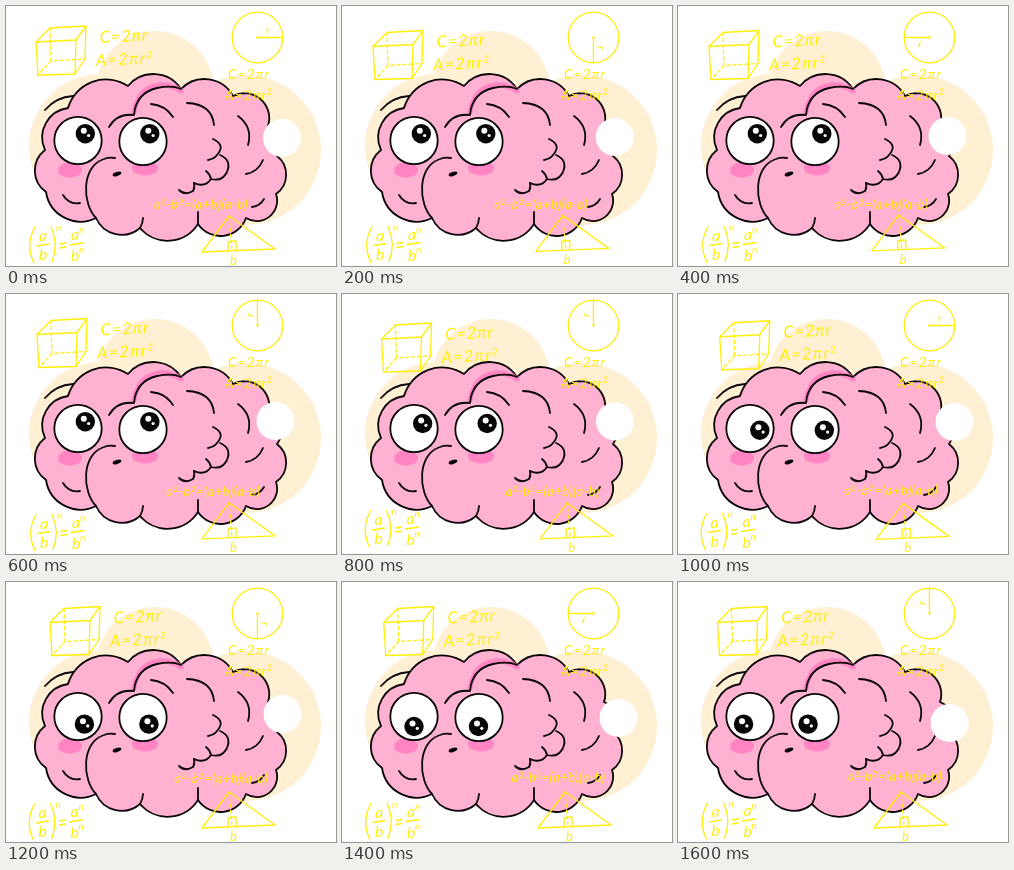
Animation of 330 by 260 pixels, one loop 1.8 s. Source, as an HTML page:

```html
<!DOCTYPE html>
<html lang="en">
<head>
<meta charset="utf-8">
<title>Thinking brain</title>
<style>
html, body { margin: 0; width: 100%; height: 100%; overflow: hidden; background: #fff; }
svg { display: block; width: 330px; height: 260px; }
.ink { fill: none; stroke: #080608; stroke-width: 1.8; stroke-linecap: round; stroke-linejoin: round; }
.shade { fill: none; stroke: #ff84c3; stroke-width: 5; stroke-linecap: round; }
.chalk { fill: none; stroke: #ffee0a; stroke-width: 1.3; stroke-linecap: round; stroke-linejoin: round; }
.dash { stroke-dasharray: 3 3; }
text { fill: #ffee0a; font-family: Lato, "Open Sans", sans-serif; font-style: italic; }
</style>
</head>
<body>
<svg viewBox="0 0 330 260" xmlns="http://www.w3.org/2000/svg">
  <g fill="#fff0d3">
    <circle cx="95" cy="140" r="72"/>
    <circle cx="149" cy="84" r="59"/>
    <circle cx="240" cy="144" r="75"/>
  </g>

  <path id="body" class="ink" style="fill:#ffb1d2"/>
  <path class="shade" d="M128 106Q132 82 153 79Q166 78 175 85"/>
  <g class="ink">
    <path d="M90 212C76 198 75 160 98 153Q103 151 109 152"/>
    <path d="M103 121Q111 107 128 109Q130 87 151 82Q166 79 175 83"/>
    <path d="M39 104Q50 91 67 90"/>
    <path d="M145 98Q159 99 167 111"/>
    <path d="M181 97Q206 98 208 119"/>
    <path d="M232 110Q247 121 242 139"/>
    <path d="M207 133Q220 139 211 149Q208 153 202 154"/>
    <path d="M214 149Q226 154 221 166Q216 176 205 173Q204 168 200 165"/>
    <path d="M205 173Q199 182 188 177"/>
    <path d="M173 184Q179 190 187 185Q189 182 188 177"/>
    <path d="M240 168Q252 166 257 154"/>
    <path d="M57 189Q63 199 74 197"/>
    <path d="M246 201Q254 200 258 193"/>
    <path d="M192 218V206"/>
    <path d="M134 222Q137 217 137 212"/>
  </g>
  <g fill="#ff84c3">
    <ellipse cx="64" cy="164" rx="12" ry="7.5"/>
    <ellipse cx="139" cy="162" rx="13" ry="7.5"/>
  </g>
  <ellipse cx="111" cy="168" rx="4.5" ry="2" transform="rotate(-18 111 168)" fill="#080608"/>
  <g class="ink" style="fill:#fff">
    <circle cx="72" cy="134.5" r="23.7"/>
    <circle cx="137" cy="135.5" r="23.7"/>
  </g>
  <g id="pupils"></g>

  <circle id="disc" r="19" fill="#fff"/>

  <g id="cube">
    <g class="chalk">
      <path d="M30 36L70 34L69 68L32 69ZM30 36L44 22L80 20L79 53L69 68M70 34L80 20"/>
      <path class="dash" d="M44 22L45 55L79 53M45 55L32 69"/>
    </g>
    <g transform="rotate(-3 94 37)" font-size="16.5">
      <text x="94" y="37" letter-spacing=".8">C=2πr</text>
      <text x="89" y="60" letter-spacing="1.2">A=2πr<tspan dy="-5" font-size="10">2</tspan></text>
    </g>
  </g>

  <circle class="chalk" cx="251.5" cy="31.5" r="25.3"/>
  <g id="radius">
    <path class="chalk" d="M251.5 31.5H276.5"/>
    <circle cx="251.5" cy="31.5" r="1.2" fill="#ffee0a"/>
    <text x="260" y="28" font-size="11">r</text>
  </g>
  <g font-size="14" letter-spacing=".8">
    <text x="222" y="73">C=2πr</text>
    <text x="219" y="94">A=2πr<tspan dy="-5" font-size="9">2</tspan></text>
  </g>

  <g id="fraction">
    <path class="chalk" d="M29 221Q19 239 28 257M45 221Q53 238 46 256M31 240L43 238M54 238L60 237M54 242L60 241M64 239L77 237"/>
    <g font-size="16">
      <text x="33" y="235">a</text><text x="33" y="254">b</text>
      <text x="65" y="234">a</text><text x="65" y="255">b</text>
    </g>
    <g font-size="10">
      <text x="50" y="225">n</text><text x="73" y="227">n</text><text x="73" y="247">n</text>
    </g>
  </g>

  <text id="squares" font-size="13" letter-spacing=".5">a<tspan dy="-4" font-size="8">2</tspan><tspan dy="4">-b</tspan><tspan dy="-4" font-size="8">2</tspan><tspan dy="4">=(a+b)(a-b)</tspan></text>

  <g id="triangle">
    <path class="chalk" d="M223 210L196 246L269 243ZM222 244V236L230 235V244"/>
    <path class="chalk dash" d="M223 210L226 244"/>
    <text x="224" y="259" font-size="13">b</text>
  </g>
</svg>
<script>
const STEP = 200, COUNT = 9;
const el = id => document.getElementById(id);

// Joins the points clockwise with outward bumps; a third value makes one rounder.
const rim = [[39,144],[62,102],[122,80],[175,83],[227,90,.54],[262,120],[271,150],
  [270,188,.53],[240,212,.56],[192,218],[134,222],[90,212],[40,186]];
el("body").setAttribute("d", rim.map(([x, y, round = .62], i) => {
  const [u, v] = rim[(i + 1) % rim.length];
  const r = Math.hypot(u - x, v - y) * round;
  return (i ? "" : `M${x} ${y}`) + `A${r} ${r} 0 0 1 ${u} ${v}`;
}).join("") + "Z");

el("pupils").innerHTML = [72, 136.5].map(x => `<g transform="translate(${x} 134.5)">
  <circle r="9.7" fill="#080608"/>
  <circle cx="-1.5" cy="-3" r="3" fill="#fff"/>
  <circle cx="3.3" cy="1.8" r="1.6" fill="#fff"/></g>`).join("");

// Straight travel between key points [step, x, y].
function along(keys, k) {
  const i = Math.max(1, keys.findIndex(p => p[0] >= k));
  const [a, x, y] = keys[i - 1], [b, u, v] = keys[i];
  const f = (k - a) / (b - a);
  return [x + (u - x) * f, y + (v - y) * f];
}

const cubeKeys = [[0,0,0],[1,1,4.5],[3,1,4.5],[4,9.5,9],[6,14,4.5],[8,9.5,4.5]];
const discKeys = [[0,276,132],[2,269.5,130],[3,269.5,127],[5,276.5,128],[7,276.5,136],[8,271.5,141]];
const fractionKeys = [[0,0,0],[1,1,-.5],[3,1,-.5],[4,-.5,-4],[6,-.5,1],[8,.5,0]];

function gaze(k) {
  const angle = Math.max(-43, 40 * (k - 4) - 30) * Math.PI / 180;
  return [10 * Math.cos(angle), 10 * Math.sin(angle)];
}

function slide(k) {
  const f = k / (COUNT - 1);
  return [148 + 22 * Math.sin(f * Math.PI / 2), 203 - 4 * f * f];
}

function sway(k) {
  const wave = Math.PI * Math.min(k, 6) / 6;
  return [-2.5 * Math.sin(2 * wave), -1.2 * Math.sin(wave)];
}

function move(id, [x, y]) {
  el(id).setAttribute("transform", `translate(${x} ${y})`);
}

function draw(ms) {
  const k = Math.floor(ms / STEP) % COUNT;
  move("cube", along(cubeKeys, k));
  move("disc", along(discKeys, k));
  move("fraction", along(fractionKeys, k));
  move("pupils", gaze(k));
  move("squares", slide(k));
  move("triangle", sway(k));
  // The hand makes quarter turns and rests once.
  const turn = 90 * (k > 3 ? k - 1 : k);
  el("radius").setAttribute("transform", `rotate(${turn} 251.5 31.5)`);
}

const start = performance.now();
function tick() {
  draw(performance.now() - start);
  requestAnimationFrame(tick);
}
tick();
</script>
</body>
</html>
```
